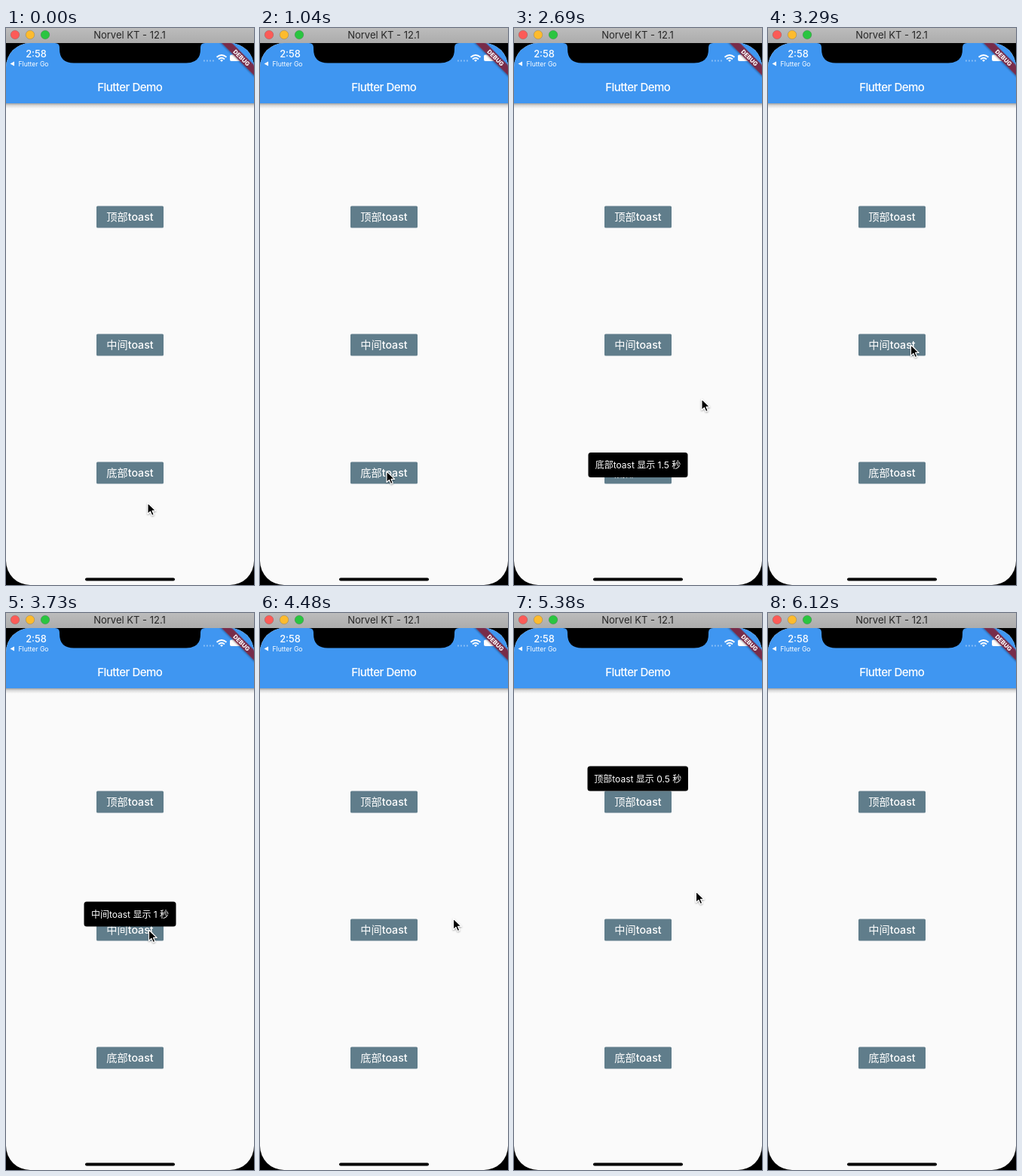
An HTML page for the animation above (6.42 s loop, 329 by 740 pixels).

```html
<!DOCTYPE html>
<html lang="zh-CN">
<head>
<meta charset="utf-8">
<title>Toast demo</title>
<style>
  html, body { margin: 0; width: 100%; height: 100%; overflow: hidden; background: #000; }
  svg { display: block; width: 329px; height: 740px; }
  text { font-family: Inter, "Noto Sans CJK SC", "Noto Sans CJK", sans-serif; fill: #fff; text-anchor: middle; }
  .button text { font-size: 14.2px; font-weight: 500; }
  .toast text { font-size: 12px; }
</style>
</head>
<body>
<svg viewBox="0 0 329 740">
  <defs>
    <linearGradient id="bar" x2="0" y2="1">
      <stop stop-color="#bcbcbc"/><stop offset="1" stop-color="#acacac"/>
    </linearGradient>
    <linearGradient id="shade" x2="0" y2="1">
      <stop stop-color="#000" stop-opacity=".36"/>
      <stop offset=".4" stop-color="#000" stop-opacity=".13"/>
      <stop offset="1" stop-color="#000" stop-opacity="0"/>
    </linearGradient>
    <clipPath id="screen"><rect y="20" width="329" height="720" rx="32"/></clipPath>
    <filter id="soft" x="-50%" y="-50%" width="200%" height="200%">
      <feDropShadow dx="0" dy="1" stdDeviation=".8" flood-opacity=".4"/>
    </filter>
  </defs>

  <!-- window title bar -->
  <rect width="329" height="740"/>
  <rect width="329" height="20" fill="url(#bar)"/>
  <g stroke-opacity=".25" stroke="#000" stroke-width=".6">
    <circle cx="12" cy="9" r="5.8" fill="#fc5b57"/>
    <circle cx="32" cy="9" r="5.8" fill="#fdbb2e"/>
    <circle cx="52" cy="9" r="5.8" fill="#2ac540"/>
  </g>
  <text x="164" y="14" font-size="13" style="fill:#262626">Norvel KT - 12.1</text>

  <!-- phone screen -->
  <g clip-path="url(#screen)">
    <rect y="20" width="329" height="720" fill="#fafafa"/>
    <rect y="20" width="329" height="80" fill="#3f96f1"/>
    <rect y="100" width="329" height="7" fill="url(#shade)"/>
    <path d="M65 20Q71 20 71 26V28Q71 46.500 90 46.500H239Q258 46.500 258 28V26Q258 20 264 20Z"/>
    <text x="40" y="38.500" font-size="12.800" font-weight="500">2:58</text>
    <path d="M5.500 47.500l5.500-3v6z" fill="#fff"/>
    <text x="36.500" y="51" font-size="8.600">Flutter Go</text>
    <text x="164.300" y="84" font-size="15" font-weight="500" letter-spacing="-.5">Flutter Demo</text>
    <path d="M262 43.500h14" stroke="#fff" stroke-opacity=".4" stroke-width="1.800" stroke-dasharray="1.800 2.200"/>
    <g fill="none" stroke="#fff" stroke-width="1.900">
      <path d="M279.500 38.800Q286 33 292.500 38.800M282 41.500Q286 38 290 41.500"/>
      <path d="M284 42.800Q286 41.200 288 42.800L286 45z" fill="#fff" stroke="none"/>
    </g>
    <rect x="297" y="35.500" width="17" height="8.500" rx="2" fill="#fff"/>
    <g transform="translate(312.500 39.500) rotate(45)">
      <rect x="-45" y="-4.800" width="90" height="9.600" fill="#7d2b43" fill-opacity=".93" filter="url(#soft)"/>
      <text y="2.900" font-size="7.800" font-weight="800">DEBUG</text>
    </g>
    <rect x="105" y="730.500" width="119" height="4" rx="2"/>
  </g>

  <g id="boxes"></g>
  <path id="cursor" d="M0 0V14.500L3.400 11.300L5.700 16.600L8.300 15.500L6 10.400H10.600Z"
        stroke="#fff" stroke-width="1.100" stroke-linejoin="round" filter="url(#soft)"/>
</svg>
<script>
const LOOP = 6420;
const boxes = document.getElementById('boxes');
const cursor = document.getElementById('cursor');

function addBox(kind, x, y, w, h, r, fill, label, baseline) {
  boxes.insertAdjacentHTML('beforeend', `<g class="${kind}">
    <rect x="${x}" y="${y}" width="${w}" height="${h}" rx="${r}" fill="${fill}"/>
    <text x="${x + w / 2}" y="${y + baseline}">${label}</text></g>`);
  return boxes.lastElementChild;
}

['顶部', '中间', '底部'].forEach((place, i) =>
  addBox('button', 120, 236.5 + 170 * i, 89, 29, 1.5, '#607d8b', place + 'toast', 19.7));

// Each toast: x, y, width, label, time shown, time hidden
const toasts = [
  [97.5, 203.5, 133.5, '顶部toast 显示 0.5 秒', 5080, 5680],
  [103.5, 383.5, 122, '中间toast 显示 1 秒', 3430, 4480],
  [98.5, 564, 132, '底部toast 显示 1.5 秒', 1340, 2840]
].map(([x, y, w, label, start, end]) =>
  ({ start, end, node: addBox('toast', x, y, w, 33, 3.5, '#000', label, 21) }));

// Pointer stops: time, x, y; each is held until the next
const stops = [
  [0, 188, 631], [600, 186, 623], [750, 180, 608], [900, 172, 595], [1040, 168, 589],
  [2390, 183, 583], [2540, 222, 541], [2690, 249, 493], [2840, 239, 454],
  [2990, 214, 432], [3140, 196, 424], [3290, 189.5, 421],
  [4480, 256.5, 406], [4630, 272, 360], [4780, 232, 296], [4930, 186, 251],
  [5230, 207, 304], [5380, 241.5, 370], [5970, 304, 550]
];

function draw(now) {
  const t = now % LOOP;
  for (const { node, start, end } of toasts)
    node.style.display = t >= start && t < end ? '' : 'none';
  const [, x, y] = stops.findLast(stop => stop[0] <= t);
  cursor.setAttribute('transform', `translate(${x} ${y})`);
  cursor.style.display = t < 6120 ? '' : 'none';
}

const begin = performance.now();
function tick() {
  draw(performance.now() - begin);
  requestAnimationFrame(tick);
}
tick();
</script>
</body>
</html>
```
